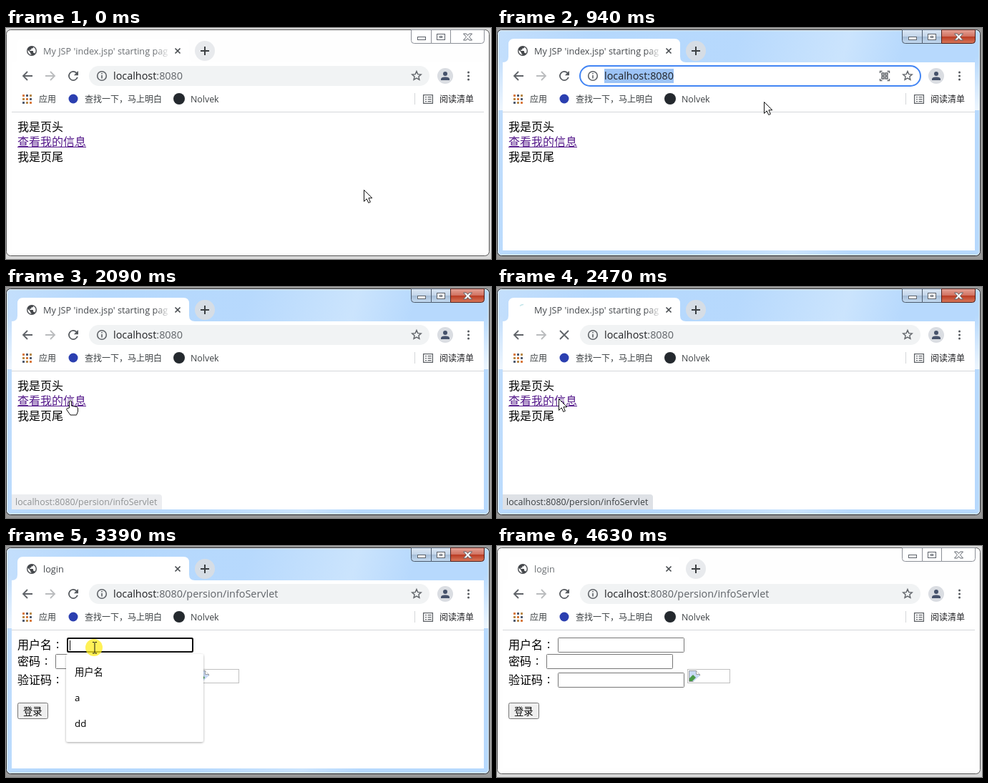
An HTML page that plays this animation: 678 px wide and 323 px high, repeating every 4.71 s.

```html
<!DOCTYPE html>
<html lang="zh-CN">
<head>
<meta charset="utf-8">
<style>
html, body { margin: 0; width: 100%; height: 100%; overflow: hidden; }
svg { display: block; width: 678px; height: 323px; font-family: "Open Sans", "Noto Sans CJK SC", "Noto Sans CJK", sans-serif; }
.ui { font-size: 12.4px; fill: #3c4043; }
.cjk { font-size: 12px; }
.page { font-size: 16px; fill: #000; }
.line { fill: none; stroke: #5f6368; stroke-width: 1.6; }
.nav { stroke-width: 1.8; }
.field { fill: #fff; stroke: #767676; }
#tabText { font-size: 12.7px; fill: #6b6f73; }
.active #tabText { fill: #45494d; }
#url { font-size: 14.4px; fill: #202124; }
#rest { fill: #5f6368; }
.focused #rest { fill: #202124; }
#desk { fill: #d9d9d9; }
.active #desk { fill: #999; }
#frame { fill: #fefefe; stroke: #555; }
.active #frame { fill: url(#glass); stroke: #22262b; }
#sheen { display: none; }
.active #sheen { display: inline; }
#plus { fill: #e8eaed; }
.active #plus { fill: #d6dde5; }
.button { fill: #fff; stroke: #8b8f97; }
.active .button { fill: url(#steel); stroke: #4c5a6c; }
.active .close { fill: url(#red); stroke: #4f1f1b; }
.glyph { fill: #fff; stroke: #5d626a; }
#pill { fill: #f1f3f4; }
.hover #pill { fill: #e8eaed; }
.focused #pill { fill: #fff; stroke: #4285f4; stroke-width: 2; }
</style>
</head>
<body>
<svg id="stage" viewBox="0 0 678 323">
<defs>
  <linearGradient id="glass" x2="1" y2=".12">
    <stop stop-color="#c4dffc"/><stop offset=".2" stop-color="#b5d8fd"/><stop offset=".5" stop-color="#b7d9fd"/>
    <stop offset=".72" stop-color="#cbe4fd"/><stop offset=".84" stop-color="#b7d9fd"/>
  </linearGradient>
  <linearGradient id="glow" x2="0" y2="1"><stop stop-color="#fff" stop-opacity="0"/><stop offset="1" stop-color="#fff" stop-opacity=".75"/></linearGradient>
  <linearGradient id="steel" x2="0" y2="1">
    <stop stop-color="#dce8f5"/><stop offset=".5" stop-color="#c3d5e9"/><stop offset=".5" stop-color="#a5bcd6"/><stop offset="1" stop-color="#c4dbf2"/>
  </linearGradient>
  <linearGradient id="red" x2="0" y2="1">
    <stop stop-color="#e6a498"/><stop offset=".5" stop-color="#d0705f"/><stop offset=".5" stop-color="#b93a22"/><stop offset="1" stop-color="#d9795c"/>
  </linearGradient>
  <linearGradient id="fade"><stop stop-color="#fff" stop-opacity="0"/><stop offset="1" stop-color="#fff"/></linearGradient>
  <filter id="shadow" x="-10%" y="-10%" width="120%" height="120%"><feDropShadow dx="0" dy="1" stdDeviation="1.5" flood-opacity=".35"/></filter>
</defs>

<rect id="desk" width="678" height="323"/>
<rect id="frame" x=".5" y="2.5" width="675" height="316" rx="6"/>
<g id="sheen">
  <path d="M1 40h7v75H1zm667 0h7v75h-7z" fill="url(#glow)"/>
  <rect x="1.5" y="3.5" width="673" height="314" rx="5" fill="none" stroke="#fff" stroke-opacity=".7"/>
</g>
<path d="M8 48q8 0 8-8V23q0-8 8-8h224q8 0 8 8v17q0 8 8 8h404v263H8z" fill="#fff"/>

<g id="caption">
  <path class="button" d="M566.5 2.5h28v19h-24q-4 0-4-4z"/>
  <path class="button" d="M594.5 2.5h27v19h-27z"/>
  <path class="button close" d="M621.5 2.5h47v15q0 4-4 4h-43z"/>
  <rect class="glyph" x="575.5" y="12.5" width="11" height="4"/>
  <rect class="glyph" x="602.5" y="8.5" width="11" height="8"/><rect class="glyph" x="606.5" y="11.5" width="3" height="2"/>
  <path class="glyph" d="M639.5 8h4l2 2.5 2-2.5h4l-4 4.5 4 4.5h-4l-2-2.5-2 2.5h-4l4-4.5z"/>
</g>

<path id="globe" transform="translate(27.6 23.6) scale(.7)" fill="#45484c" d="M12 2a10 10 0 1 0 0 20 10 10 0 0 0 0-20zm-1 17.93c-3.95-.49-7-3.85-7-7.93 0-.62.08-1.21.21-1.79L9 15v1c0 1.1.9 2 2 2zm6.9-2.54c-.26-.81-1-1.39-1.9-1.39h-1v-3c0-.55-.45-1-1-1H8v-2h2c.55 0 1-.45 1-1V7h2c1.1 0 2-.9 2-2v-.41c2.93 1.19 5 4.06 5 7.41 0 2.08-.8 3.97-2.1 5.39z"/>
<path id="spinner" d="M32 26.5a7 7 0 0 1 5-2" fill="none" stroke="#c3e6ea" stroke-width="1.5"/>
<text id="tabText" x="52" y="37"></text>
<rect x="208" y="20" width="22" height="24" fill="url(#fade)"/>
<path class="line" d="M236.5 28.5l7 7m0-7l-7 7" style="stroke:#45494d"/>
<circle id="plus" cx="278" cy="32" r="14"/>
<path class="line" d="M272 32h12m-6-6v12" style="stroke:#3c4043;stroke-width:2"/>

<path class="line nav" d="M37 67H24m6-6l-6 6 6 6"/>
<path class="line nav" d="M55 67h13m-6-6l6 6-6 6" style="stroke:#babcbe"/>
<path id="reload" transform="translate(83.6 56.6) scale(.87)" fill="#55595e" d="M17.65 6.35A8 8 0 1 0 19.73 14h-2.08A6 6 0 1 1 16.22 7.78L13 11h7V4z"/>
<path id="stop" class="line nav" d="M88 61l12 12m0-12L88 73"/>

<rect id="pill" x="116" y="53" width="476" height="28" rx="14"/>
<circle class="line" cx="134" cy="67" r="6.3"/>
<path class="line" d="M134 66v4.5m0-7.5v1.6"/>
<rect id="selection" x="150" y="57" width="97" height="20" fill="#9cc3f6"/>
<text id="url" x="150" y="72">localhost<tspan id="rest"></tspan></text>
<g id="codeIcon" class="line" style="stroke-width:1.4">
  <path d="M535.5 63v-2.5h3m7 0h3V63m0 8v2.5h-3m-7 0h-3V71"/>
  <path d="M538 63h3v3h-3zm5 0h3v3h-3zm-5 5h3v3h-3zm5 0h3v3h-3z"/>
</g>
<path class="line" transform="translate(566.4 59.2) scale(.63)" style="stroke-width:2.2" d="M12 17.27L18.18 21l-1.64-7.03L22 9.24l-7.19-.61L12 2 9.19 8.63 2 9.24l5.46 4.73L5.82 21z"/>
<circle cx="614" cy="67" r="11" fill="#dadde2"/>
<g fill="#46526b"><circle cx="614" cy="64" r="3"/><path d="M608 73v-1.5q0-3 6-3t6 3V73z"/></g>
<g fill="#55595e"><circle cx="646.5" cy="62" r="1.5"/><circle cx="646.5" cy="67" r="1.5"/><circle cx="646.5" cy="72" r="1.5"/></g>

<g id="apps"></g>
<circle cx="94" cy="99" r="6.5" fill="#2b3fb0"/>
<circle cx="242" cy="99" r="8" fill="#24292e"/>
<g class="ui">
  <text class="cjk" x="46" y="104">应用</text>
  <text class="cjk" x="110" y="104">查找一下，马上明白</text>
  <text x="258" y="104">Nolvek</text>
  <text class="cjk" x="606" y="104" fill="#202124">阅读清单</text>
</g>
<path d="M571.5 91v16M8 117.5h660" stroke="#d5d7da"/>
<path class="line" style="stroke-width:1.3" d="M583.6 93.6h12.8v11.8h-12.8zm2.4 3h2m1.5 0h5m-8.500 3h2m1.5 0h5m-8.500 3h2m1.5 0h5"/>

<g id="home" class="page">
  <text x="16" y="143.5">我是页头</text>
  <text x="16" y="164.5" fill="#551a8b">查看我的信息</text>
  <path d="M16 166.5h96" stroke="#551a8b"/>
  <text x="16" y="185.5">我是页尾</text>
</g>

<g id="login" class="page">
  <text x="16" y="143.5">用户名</text><text x="70" y="143">:</text>
  <text x="16" y="166.5">密码</text><text x="54" y="166">:</text>
  <text x="16" y="192.5">验证码</text><text x="70" y="192">:</text>
  <rect class="field" x="85.5" y="128.5" width="176" height="20" rx="1"/>
  <rect class="field" id="password" x="69.5" y="151.5" width="176" height="20" rx="1"/>
  <rect class="field" x="85.5" y="177.5" width="176" height="20" rx="1"/>
  <rect x="266.5" y="172.5" width="59" height="19" fill="#fff" stroke="#c0c0c0"/>
  <path d="M268.5 174.5h10l5 5v10h-15z" fill="#c9daf5" stroke="#9a9da1"/>
  <path d="M269 189v-4l5-5 4 4-5 5z" fill="#4c9a4a"/><path d="M274 190l10-9v9z" fill="#fff"/>
  <path d="M278.5 174.5v5h5" fill="#fff" stroke="#9a9da1"/>
  <rect x="16.5" y="219.5" width="42" height="22" rx="2" fill="#efefef" stroke="#767676"/>
  <text x="24" y="235.5" font-size="13.3">登录</text>
  <g id="focusRing">
    <rect x="86" y="129" width="175" height="19" rx="2" fill="#fff" stroke="#101010" stroke-width="2"/>
    <path d="M89.5 132v14" stroke="#000"/>
  </g>
  <g id="menu" font-size="13.3">
    <rect x="84" y="151" width="192" height="123" rx="3" fill="#fff" filter="url(#shadow)"/>
    <text x="96" y="180.5">用户名</text><text x="96" y="217">a</text><text x="96" y="253">dd</text>
  </g>
</g>

<g id="status">
  <path d="M8 290h206q4 0 4 4v17H8z" fill="#dee1e6"/>
  <text class="ui" x="13" y="305">localhost:8080/persion/infoServlet</text>
</g>

<g id="pointer">
  <circle id="click" r="12" fill="#ffec1f" opacity=".75"/>
  <path id="arrowCursor" d="M.5.5v16l3.7-3.6 2.6 5.6 2.6-1.2-2.5-5.5h5z" fill="#fff" stroke="#111"/>
  <path id="beamCursor" d="M-2-7.5H.5m1 0H4M1-7V7.5M-2 8H.5m1 0H4" fill="none" stroke="#111"/>
  <path id="handCursor" d="M-1.5 10V1.5Q-1.5 0 0 0t1.5 1.5V7l7 1.5q2 .5 2 2.5v4l-2 5H0l-5-7q-1-2 1-2.5z" fill="#fff" stroke="#111"/>
</g>
</svg>

<script>
const LOOP = 4710;
const $ = id => document.getElementById(id);
const stage = $('stage');
const show = (id, on) => $(id).style.display = on ? '' : 'none';
const clamp = v => Math.max(0, Math.min(1, v));

// Pointer path: time, x, y
const path = [
  [0, 500, 226], [70, 500, 226], [230, 462, 160], [390, 395, 72], [540, 373, 61], [780, 373, 64],
  [940, 373, 103], [1000, 373, 108], [1110, 366, 140], [1210, 352, 152], [1540, 194, 187], [1690, 160, 184],
  [1850, 118, 172], [2080, 90, 159], [2250, 86, 156], [2940, 86, 156], [3090, 105, 149], [3230, 123, 142],
  [3550, 123, 142], [3700, 245, 142], [3860, 380, 145], [4030, 468, 156], [4100, 494, 202],
  [4170, 523, 251], [4250, 545, 275], [4400, 585, 305], [4560, 598, 323], [LOOP, 598, 330]
];
// Spans during which the click marker is visible
const clicks = [[460, 690], [1050, 1210], [2320, 2460], [3230, 3550], [3780, 3940]];

function pointerAt(t) {
  const i = path.findIndex(p => p[0] > t);
  const [t0, x0, y0] = path[i - 1], [t1, x1, y1] = path[i];
  const k = (t - t0) / (t1 - t0);
  return [x0 + (x1 - x0) * k, y0 + (y1 - y0) * k];
}

for (let i = 0; i < 9; i++) {
  const x = 23 + i % 3 * 5, y = 93 + Math.floor(i / 3) * 5;
  const color = ['#d8783c', '#b98a4a', '#515c70'][(i * 2 + Math.floor(i / 3)) % 3];
  $('apps').innerHTML += `<rect x="${x}" y="${y}" width="3" height="3" fill="${color}"/>`;
}

function render(t) {
  const within = (a, b) => t >= a && t < b;
  const loaded = t >= 2630;
  const loading = within(2390, 2630);
  const focused = within(620, 1110);

  stage.classList.toggle('active', within(620, 4630));
  stage.classList.toggle('focused', focused);
  stage.classList.toggle('hover', within(390, 620));
  show('selection', focused);
  show('codeIcon', focused);

  $('tabText').textContent = loaded ? 'login' : "My JSP 'index.jsp' starting pag";
  $('rest').textContent = loaded ? ':8080/persion/infoServlet' : ':8080';
  show('globe', !loading);
  show('spinner', loading);
  show('reload', !loading);
  show('stop', loading);
  $('spinner').setAttribute('transform', `rotate(${(t - 2470) * .36} 36 32)`);

  show('home', !loaded);
  show('login', loaded);
  $('password').style.stroke = t < 3020 ? '#4a4a4a' : '';
  show('focusRing', within(3230, 3780));
  show('menu', within(3310, 3780));
  show('status', within(2010, 2860));
  $('status').style.opacity = Math.min(clamp((t - 2000) / 160), clamp((2870 - t) / 200));

  const beam = within(390, 860) || within(2710, 3620);
  const hand = within(2010, 2390);
  show('pointer', t < 4560);
  show('beamCursor', beam);
  show('handCursor', hand);
  show('arrowCursor', !beam && !hand);
  show('click', clicks.some(([a, b]) => within(a, b)));
  $('pointer').setAttribute('transform', `translate(${pointerAt(t).map(Math.round)})`);
}

const start = performance.now();
(function tick() {
  render((performance.now() - start) % LOOP);
  requestAnimationFrame(tick);
})();
</script>
</body>
</html>
```
